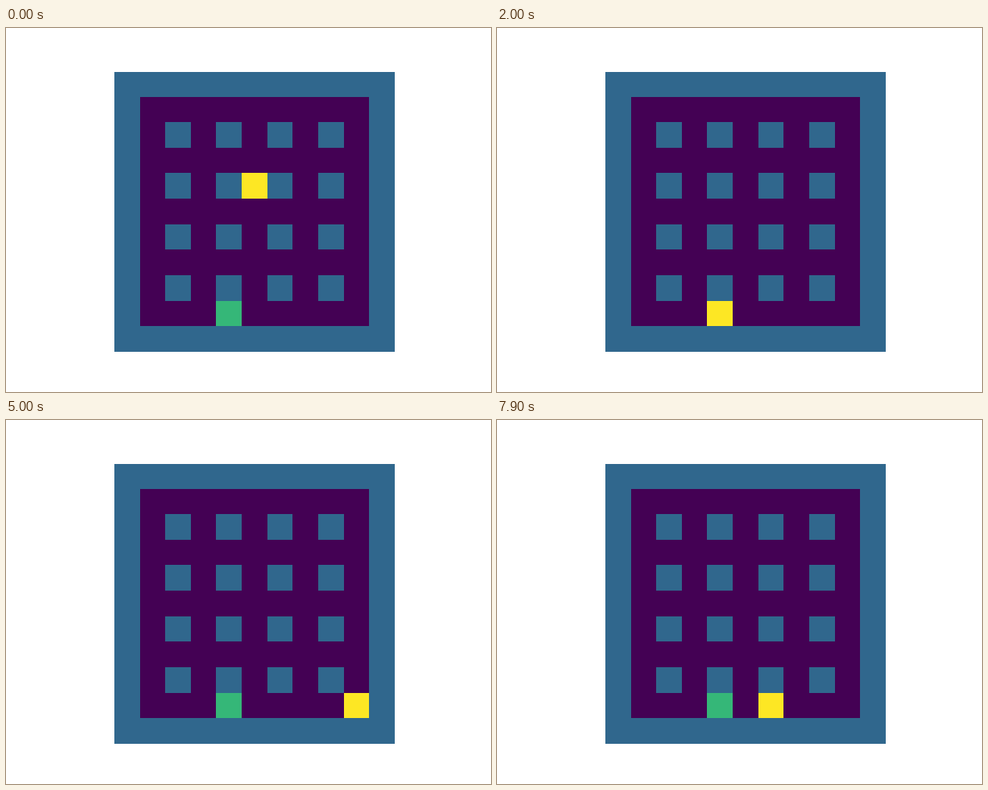
Recreate the animation shown at these times as a matplotlib script. Size 640x480 px, loop 8000 ms.

```python
import numpy as np
import matplotlib.pyplot as plt
from matplotlib.animation import FuncAnimation

SIZE = 11
FLOOR, WALL, GOAL, AGENT = range(4)
GOAL_CELL = (4, 9)

# Each episode is a list of (column, row) corners walked one cell per frame;
# a repeated corner means the agent bumps into a wall and stays put.
EPISODES = [
    [(5, 4), (5, 1), (9, 1), (9, 9), GOAL_CELL],
    [(8, 9)] + [(9, 9)] * 5 + [GOAL_CELL],
    [(9, 1), (9, 9), (7, 9), (8, 9), GOAL_CELL],
    [(7, 9), (9, 9), (9, 9), GOAL_CELL],
    [(5, 2), (5, 9), GOAL_CELL],
    [(9, 9), GOAL_CELL],
    [(7, 3), (7, 9), (6, 9)],
]


def walk(corners):
    cells = [corners[0]]
    for (c0, r0), (c1, r1) in zip(corners, corners[1:]):
        steps = max(abs(c1 - c0), abs(r1 - r0), 1)
        for i in range(1, steps + 1):
            cells.append((c0 + (c1 - c0) * i // steps,
                          r0 + (r1 - r0) * i // steps))
    return cells


def build_maze():
    maze = np.full((SIZE, SIZE), WALL)
    maze[1:-1, 1:-1] = FLOOR
    maze[2:-1:2, 2:-1:2] = WALL
    maze[GOAL_CELL[1], GOAL_CELL[0]] = GOAL
    return maze


maze = build_maze()
path = [cell for corners in EPISODES for cell in walk(corners)]

fig, ax = plt.subplots(figsize=(6.4, 4.8), dpi=100)
ax.axis("off")
image = ax.imshow(maze, cmap="viridis", vmin=FLOOR, vmax=AGENT,
                  interpolation="nearest")


def update(frame):
    grid = maze.copy()
    col, row = path[frame]
    grid[row, col] = AGENT
    image.set_data(grid)
    return [image]


anim = FuncAnimation(fig, update, frames=len(path), interval=100,
                     repeat=True, repeat_delay=0)
plt.show()
```
